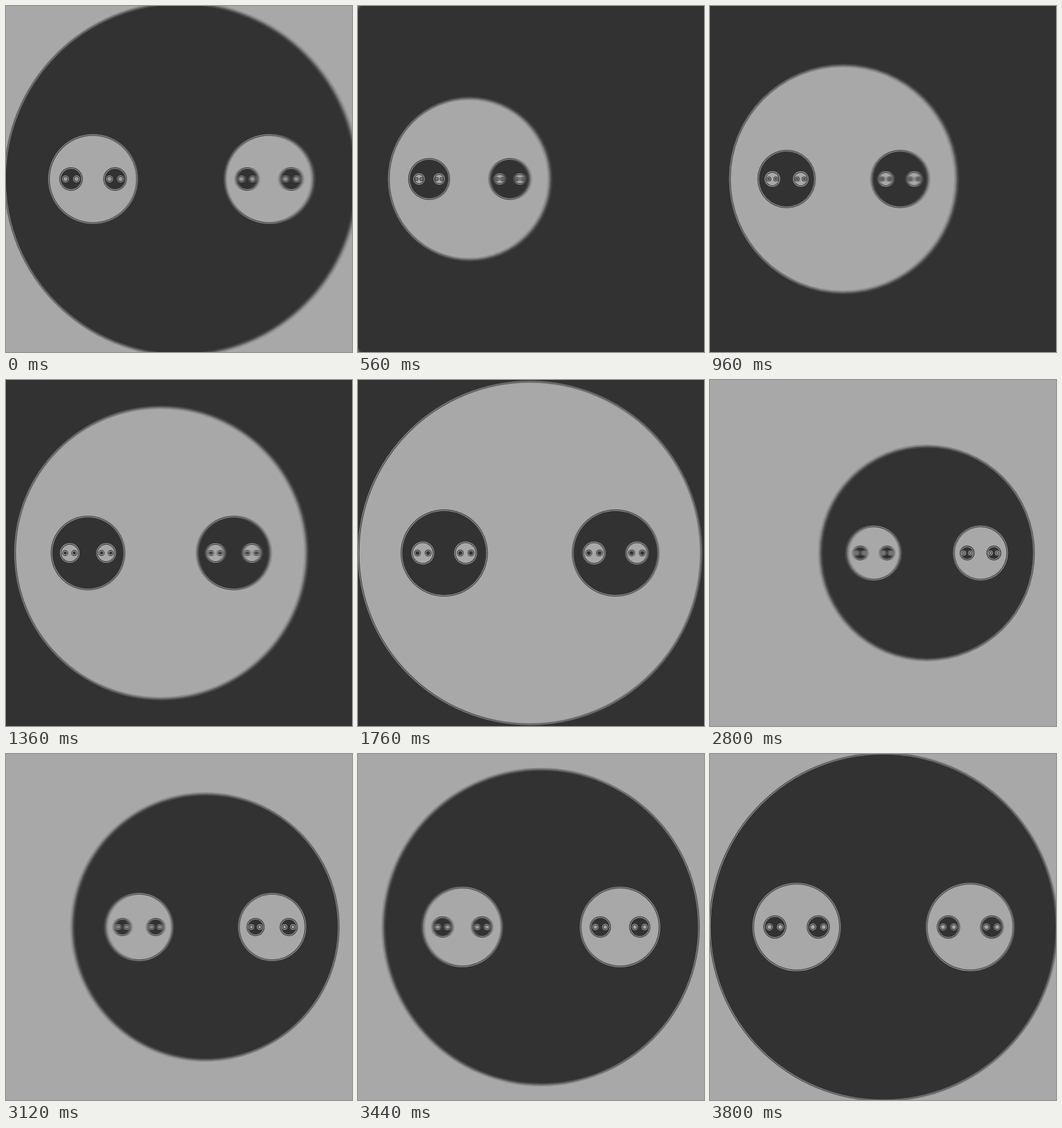
Animation, 500 px wide and 500 px high, one loop 3.84 s. Source, as an HTML page with a canvas:

```html
<!DOCTYPE html>
<html>
<head>
<meta charset="utf-8">
<style>
  html, body { margin: 0; width: 100%; height: 100%; overflow: hidden; background: #323232; }
  canvas { display: block; width: 500px; height: 500px; }
</style>
</head>
<body>
<canvas id="stage" width="500" height="500"></canvas>
<script>
const SIZE = 500, LOOP = 3840, HALF = LOOP / 2, STEP = 40;
const SAMPLES = 12, SHUTTER_OPEN = 1.2 * STEP, SHUTTER_CLOSE = 2 * STEP;
const DARK = '#323232', LIGHT = '#a8a8a8';

const view = document.getElementById('stage').getContext('2d');
const layer = document.createElement('canvas');
layer.width = layer.height = SIZE;
const pen = layer.getContext('2d');

// Soft start and stop with a nearly constant speed between.
const ramp = u => Math.hypot(1.26 * u, 0.147) - 0.147;
const ease = x => x < 0.5 ? ramp(x) : 1 - ramp(1 - x);

function dot(x, r, color) {
  pen.fillStyle = color;
  pen.beginPath();
  pen.arc(x, SIZE / 2, r, 0, 2 * Math.PI);
  pen.fill();
}

// Each disc has a hairline rim and holds two discs a quarter of its size,
// in the other colour.
function disc(x, r, color, other) {
  if (r < 1 || x + r + 1 < 0 || x - r - 1 > SIZE) return;
  dot(x, r + 1, color);
  dot(x, r, other);
  dot(x, r - 1, color);
  disc(x - r / 2, r / 4, other, color);
  disc(x + r / 2, r / 4, other, color);
}

// phase 0..1 zooms into the left disc, 1..2 into the right one.
function scene(phase) {
  phase %= 2;
  const left = phase < 1;
  const scale = 1 + 3 * ease(phase % 1);
  const fixed = left ? SIZE / 6 : SIZE * 5 / 6;
  const [color, back] = left ? [DARK, LIGHT] : [LIGHT, DARK];
  pen.fillStyle = back;
  pen.fillRect(0, 0, SIZE, SIZE);
  disc(fixed + (SIZE / 2 - fixed) * scale, SIZE / 2 * scale, color, back);
}

// Average several moments for motion blur.
function render(time) {
  for (let i = 0; i < SAMPLES; i++) {
    const f = (i + 0.5) / SAMPLES;
    scene((time + SHUTTER_OPEN + (SHUTTER_CLOSE - SHUTTER_OPEN) * f) / HALF);
    view.globalAlpha = 1 / (i + 1);
    view.drawImage(layer, 0, 0);
  }
}

let shown = -1;
function tick() {
  const time = Math.floor(performance.now() % LOOP / STEP) * STEP;
  if (time !== shown) render(shown = time);
  requestAnimationFrame(tick);
}
tick();
</script>
</body>
</html>
```
